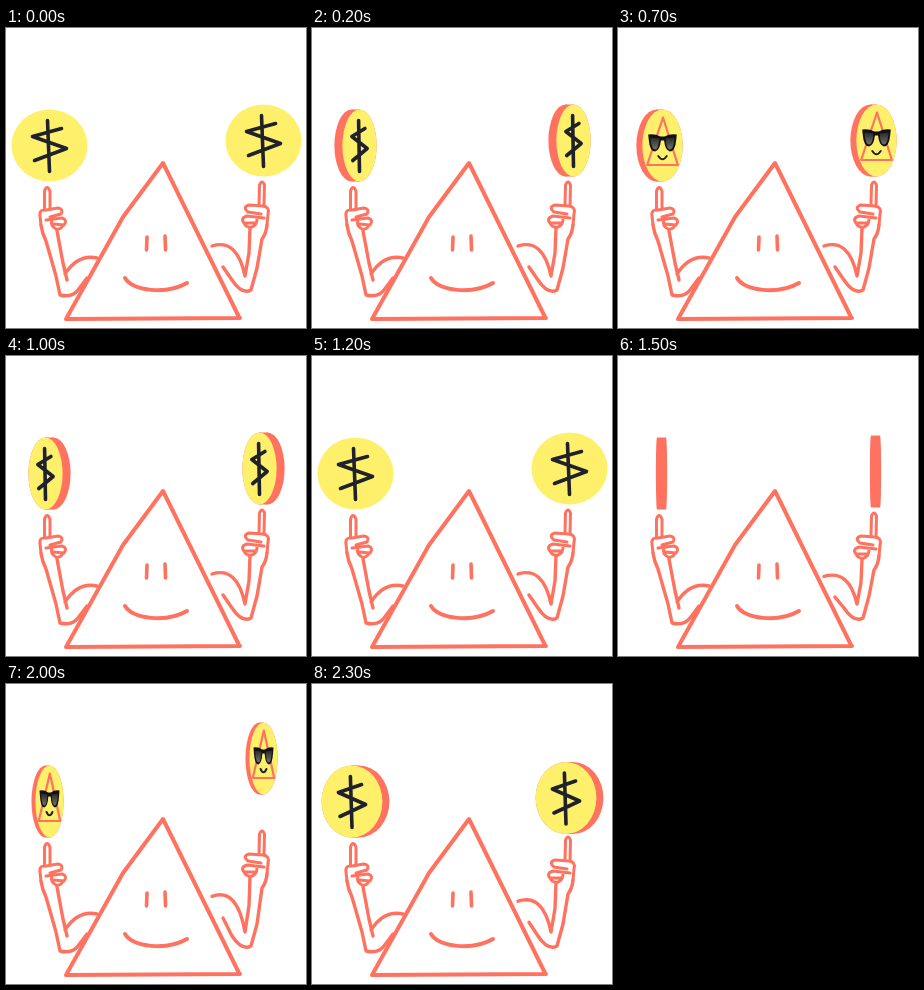
Recreate the animation shown at these times as an HTML page with a canvas. Size 300 by 300 pixels, loop 2.4 s.

```html
<!DOCTYPE html>
<html lang="en">
<head>
<meta charset="utf-8">
<title>Coin spinner</title>
<style>
html, body { margin: 0; width: 100%; height: 100%; overflow: hidden; background: #fff; }
canvas { display: block; width: 300px; height: 300px; }
</style>
</head>
<body>
<canvas id="stage" width="300" height="300"></canvas>
<script>
const ctx = document.getElementById('stage').getContext('2d');
const RED = '#ff725f', YELLOW = '#fff06c', INK = '#20222b';
const STEP = 100, STEPS = 24;
const RX = 38, RY = 36;

// One turn in 12 poses: face width ratio and rim offset
const WIDTHS = [1, .8, .45, .03, .36, .79, 1, .53, .37, .03, .45, .8];
const RIMS = [0, -7, -8, 9, 9, 8, 0, -6, -4, -9, 8, 7];

// Height of the tossed coin and the hand under it, during the second turn
const TOSS = [0, 0, 1, 3, 0, -9, -38, -68, -38, -8, 3, 1.5];
const LIFT = [0, 0, 1, 3, 0, -9, -9, -8, -7, -5, 1, -1];

// Paths are squeezed sideways by w, while the line keeps its weight
function shape(d, w = 1) {
  const path = new Path2D();
  path.addPath(new Path2D(d), new DOMMatrix([w, 0, 0, 1, 0, 0]));
  return path;
}

function stroke(d, color = RED, width = 4, w = 1) {
  ctx.strokeStyle = color;
  ctx.lineWidth = width;
  ctx.stroke(shape(d, w));
}

function ellipse(x, rx, color) {
  ctx.fillStyle = color;
  ctx.beginPath();
  ctx.ellipse(x, 0, rx, RY, 0, 0, Math.PI * 2);
  ctx.fill();
}

function drawDollar(w) {
  stroke('M-2-25L0 26M12-17L-17-9L17 3L-15 15', INK, 3.6, w);
}

function drawCoolFace(w) {
  stroke('M1-28L-29 19.5L29 19.5Z', RED, 2.2, w);
  ctx.fillStyle = '#111';
  ctx.fill(shape('M-27-11Q-14-12-4-9L4-9Q14-12 27-11L26-6Q24 6 14 6Q5 5 3-5L-3-5Q-5 5-14 6Q-24 6-26-6Z', w));
  const glass = ctx.createLinearGradient(0, -9, 0, 5);
  glass.addColorStop(0, '#222');
  glass.addColorStop(1, '#777');
  ctx.fillStyle = glass;
  ctx.fill(shape('M-23-8L-6-7Q-7 4-14 4Q-21 4-23-8M23-8L6-7Q7 4 14 4Q21 4 23-8', w));
  stroke('M-8 10.5Q0 17 8 10.5', INK, 2, w);
}

function drawCoin(x, y, pose) {
  const w = WIDTHS[pose], rim = RIMS[pose], rx = RX * w;
  const back = pose > 3 && pose < 9;
  ctx.save();
  ctx.translate(x - rim / 2 - (back ? 2 : 0), y);
  if (rim) {
    ellipse(rim, rx, RED);
    ellipse(0, rx, RED);
    ctx.fillRect(Math.min(0, rim), -RY, Math.abs(rim), RY * 2);
  }
  if (w > .1) {
    ellipse(0, rx, YELLOW);
    if (back) drawCoolFace(w);
    else drawDollar(w);
  }
  ctx.restore();
}

function drawBody() {
  stroke('M60 291Q79 257 117 189L157 135L233 289M60 291L234 290', RED, 4);
  stroke('M141 209L140.5 222M159 208L159.5 222', RED, 3.6);
  stroke('M119 250C127 263 160 267 181 255');
}

function drawLeftArm() {
  stroke('M38.5 182L38.5 163Q41 156 44 163L44 180', RED, 3);
  stroke('M35 197L34 188Q33 181 40 182L52 180Q58 181 55 186L44 189'
    + 'M40 192L56 190Q62 192 58 197L47 196M46 192Q44 198 50 201Q55 202 57 197', RED, 3);
  stroke('M35 197Q36 205 40 213L50 248L54 267Q66 270 72 262L81 250'
    + 'M51 203L57 235L61 252M59 246Q72 226 91 230', RED, 3.4);
}

function drawRightArm(lift) {
  ctx.save();
  ctx.translate(0, lift);
  stroke('M253 177L253.5 157Q256 151 258.5 157L258 178', RED, 3);
  stroke('M261 197L262 186Q264 179 257 178L243 177Q236 179 242 184L255 186'
    + 'M258 190L241 188Q234 190 238 195L250 195M238 195Q240 200 246 199Q251 197 251 191', RED, 3);
  ctx.restore();
  stroke(`M261 ${197 + lift}Q260 ${206 + lift} 256 ${211 + lift}L251 240L245 262Q236 267 226 252L217 ${239 + lift * .7}`
    + `M244 ${200 + lift}L243 ${225 + lift / 2}L239 248Q231 ${210 + lift} 206 ${218 + lift * .8}`, RED, 3.4);
}

function draw() {
  const step = Math.floor(performance.now() / STEP) % STEPS;
  const pose = step % 12, tossing = step >= 12;
  ctx.fillStyle = '#fff';
  ctx.fillRect(0, 0, 300, 300);
  ctx.lineCap = ctx.lineJoin = 'round';
  drawBody();
  drawLeftArm();
  drawRightArm(tossing ? LIFT[pose] : 0);
  drawCoin(43.5, 117.5, pose);
  drawCoin(257.5, 112.5 + (tossing ? TOSS[pose] : 0), pose);
  requestAnimationFrame(draw);
}
draw();
</script>
</body>
</html>
```
